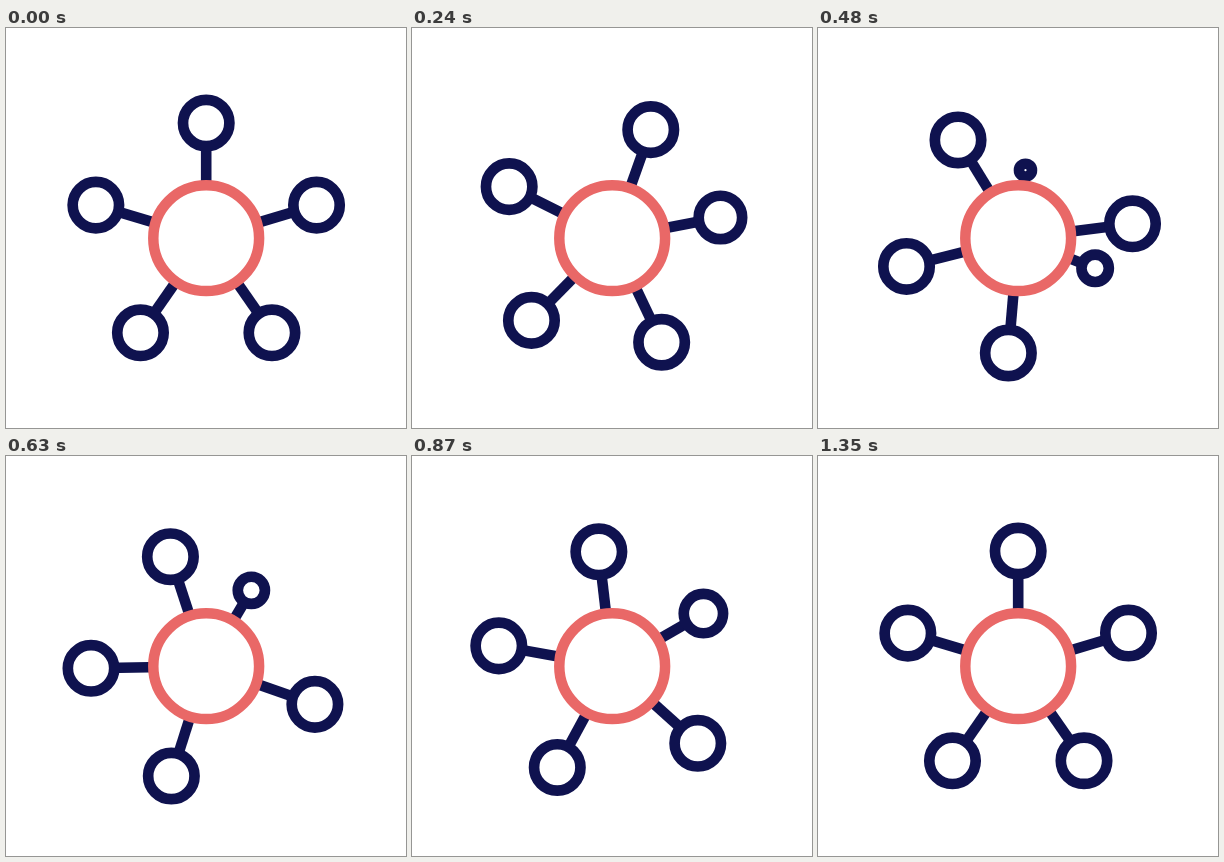
Animation, 400 px wide and 400 px high, one loop 1380 ms. Source, as an HTML page with a canvas:

```html
<!DOCTYPE html>
<html lang="en">
<head>
<meta charset="utf-8">
<title>Hub rotation</title>
<style>
  html, body { margin: 0; width: 100%; height: 100%; overflow: hidden; background: #fff; }
  canvas { display: block; width: 400px; height: 400px; }
</style>
</head>
<body>
<canvas id="stage" width="400" height="400"></canvas>
<script>
const ctx = document.getElementById('stage').getContext('2d');
const LOOP = 1380, STEP = 30;
const NAVY = '#0f124f', CORAL = '#e96867';
const CX = 200.2, CY = 210.2, ORBIT = 115.2, RING = 23.2;
// Resting angles in degrees, clockwise from the top
const SLOTS = [0, 73.3, 145.2, 214.8, 286.7, 360];

const clamp = v => Math.min(1, Math.max(0, v));
const mix = (a, b, k) => a + (b - a) * k;

// Cubic bezier easing (0.345, 0, 0.167, 1), solved by bisection
function ease(x) {
  x = clamp(x);
  let lo = 0, hi = 1;
  for (let i = 0; i < 24; i++) {
    const s = (lo + hi) / 2, r = 1 - s;
    if (3 * s * r * (0.345 * r + 0.167 * s) + s * s * s < x) lo = s; else hi = s;
  }
  return lo * lo * (3 - 2 * lo);
}

function disc(x, y, radius, color, width) {
  ctx.beginPath();
  ctx.arc(x, y, radius, 0, Math.PI * 2);
  ctx.fillStyle = '#fff';
  ctx.fill();
  ctx.strokeStyle = color;
  ctx.lineWidth = width;
  ctx.stroke();
}

function satellite(angle, distance = ORBIT, radius = RING) {
  if (radius <= 0 || distance <= 0) return;
  const a = angle * Math.PI / 180;
  const x = CX + distance * Math.sin(a), y = CY - distance * Math.cos(a);
  ctx.beginPath();
  ctx.moveTo(CX, CY);
  ctx.lineTo(x, y);
  ctx.strokeStyle = NAVY;
  ctx.lineWidth = 10.6;
  ctx.stroke();
  disc(x, y, radius, NAVY, 10.7);
}

function draw(t) {
  const p = ease(t / LOOP);
  ctx.fillStyle = '#fff';
  ctx.fillRect(0, 0, 400, 400);

  // One satellite sinks behind the hub while its replacement grows out
  if (t < 620) {
    const u = Math.pow(t / 620, 2.7);
    satellite(SLOTS[1] + 76 * u, ORBIT - 65 * u, RING - 19 * u);
  }
  if (t > 330) {
    const q = ease((t - 330) / (LOOP - 330));
    satellite(SLOTS[1] * q, ORBIT - 109 * (1 - p), RING - 39 * (1 - p));
  }

  for (const i of [2, 3, 4]) satellite(mix(SLOTS[i], SLOTS[i + 1], p));
  satellite(mix(SLOTS[0], SLOTS[2], p));
  disc(CX, CY, 52.9, CORAL, 10.5);
}

const start = performance.now();
function tick() {
  const t = (performance.now() - start) % LOOP;
  draw(Math.floor(t / STEP) * STEP);
  requestAnimationFrame(tick);
}
tick();
</script>
</body>
</html>
```
